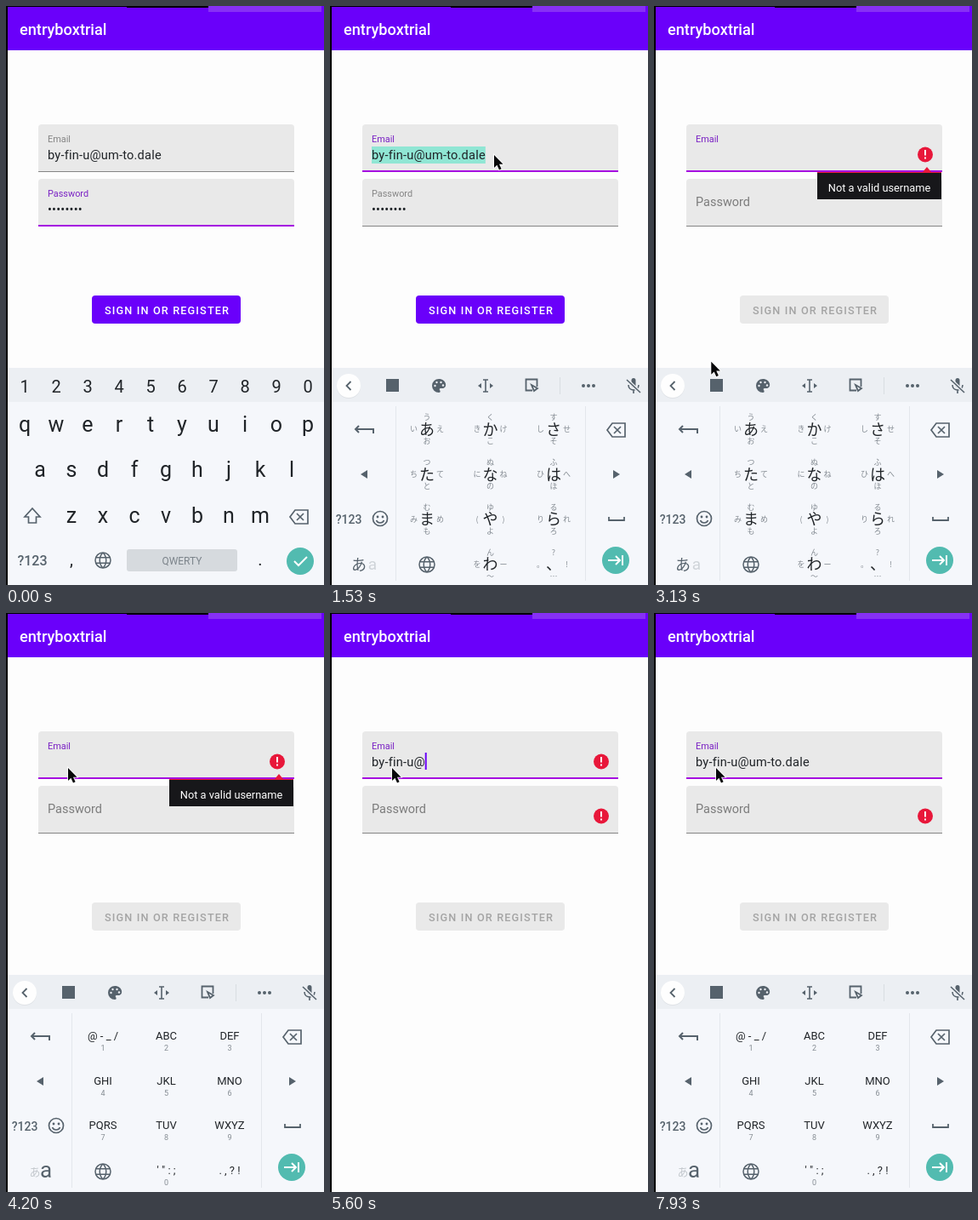
Recreate the animation shown at these times as an HTML page with a canvas. Size 374 by 680 pixels, loop 8000 ms.

```html
<!DOCTYPE html>
<html lang="en">
<head>
<meta charset="utf-8">
<title>Sign in form</title>
<style>
html, body { margin: 0; width: 100%; height: 100%; overflow: hidden; background: #fdfdfd; }
canvas { display: block; }
</style>
</head>
<body>
<canvas id="stage" width="374" height="680"></canvas>
<script>
const ctx = document.getElementById('stage').getContext('2d');
const LOOP = 8000;
const PURPLE = '#6a00fa', ACCENT = '#a50ce0', LABEL = '#7a22c4', RED = '#e8173a', TEAL = '#52bbb0';
const INK = '#202428', GREY = '#56626c', SOFT = '#848b92', FIELD = '#e9e9e9', BAR = '#eceff3', KEYS = '#f5f7fb';
const SANS = 'Roboto, sans-serif', KANA = '"Noto Sans CJK JP", "Noto Sans CJK", sans-serif';
const ADDRESS = 'by-fin-u@um-to.dale';

const typedAt = [4470, 4600, 4730, 4930, 5000, 5130, 5270, 5330, 5530, 6070,
  6200, 6600, 6930, 7130, 7330, 7400, 7530, 7600, 7730];
// Each stop: time, x, y.
const pointerPath = [[70, 350, 300], [200, 290, 250], [400, 290, 250], [600, 193, 175],
  [1670, 193, 175], [2070, 147, 238], [2530, 147, 238], [2800, 95, 180], [2930, 95, 180],
  [3330, 40, 652], [3530, 40, 652], [4130, 73, 182], [8000, 73, 182]];

function text(str, x, y, size, color = INK, o = {}) {
  ctx.font = `${o.weight || 400} ${size}px ${o.family || SANS}`;
  ctx.textAlign = o.align || 'center';
  ctx.textBaseline = o.base || 'alphabetic';
  ctx.letterSpacing = (o.gap || 0) + 'px';
  ctx.fillStyle = color;
  ctx.fillText(str, x, y);
  ctx.letterSpacing = '0px';
}

function rect(x, y, w, h, color, radius = 0) {
  ctx.fillStyle = color;
  ctx.beginPath();
  ctx.roundRect(x, y, w, h, radius);
  ctx.fill();
}

function disc(x, y, r, color) {
  ctx.fillStyle = color;
  ctx.beginPath();
  ctx.arc(x, y, r, 0, Math.PI * 2);
  ctx.fill();
}

// SVG path data centred on (x, y); stroked when a line width is given.
function icon(d, x, y, color = GREY, width = 0) {
  const path = new Path2D(d);
  ctx.save();
  ctx.translate(x, y);
  if (width) {
    ctx.strokeStyle = color;
    ctx.lineWidth = width;
    ctx.stroke(path);
  } else {
    ctx.fillStyle = color;
    ctx.fill(path);
  }
  ctx.restore();
}

function globe(x, y) {
  icon('M-9 0A9 9 0 1 0 9 0A9 9 0 1 0-9 0M-8-3.2H8M-8 3.2H8M0-9C-5-4-5 4 0 9C5 4 5-4 0-9', x, y, GREY, 1.5);
}

function backspace(x, y) {
  icon('M-11 0L-5-8H10V8H-5ZM-3-4L5 4M5-4L-3 4', x, y, GREY, 1.7);
}

function qwertyKeyboard() {
  rect(2, 425, 372, 255, KEYS);
  rect(2, 425, 372, 40, BAR);
  const row = (keys, x, y, size) => [...keys].forEach((k, i) => text(k, x + 37 * i, y, size));
  row('1234567890', 22, 454, 20);
  row('qwertyuiop', 22, 500, 25);
  row('asdfghjkl', 40, 553, 25);
  row('zxcvbnm', 77, 607, 25);
  icon('M0-9L9 1H4.5V8H-4.5V1H-9Z', 31, 599, GREY, 1.7);
  backspace(345, 600);
  text('?123', 31, 657, 16, GREY, { weight: 500 });
  text(',', 77, 657, 20);
  globe(114, 651);
  rect(142, 638, 130, 26, '#d6dade', 3);
  text('QWERTY', 207, 656, 12, '#7c848b');
  text('.', 299, 657, 20);
  disc(346, 652, 16, TEAL);
  icon('M-7 0L-2 5L8-5', 346, 652, '#fff', 2);
}

function toolbar() {
  rect(2, 425, 372, 40, BAR);
  disc(22, 447, 14, '#dfe2e6');
  disc(22, 446, 14, '#fefefe');
  icon('M2.5-5L-2.5 0L2.5 5', 22, 446, GREY, 1.8);
  rect(66, 438, 15, 15, GREY);
  icon('M0-8A8 8 0 0 0 0 8C2 8 2 6 1 5C0 3 2 3 4 3C11 3 9-8 0-8Z', 128, 446);
  for (const [x, y] of [[-4.5, 0], [-2.5, -4], [2.5, -4], [5, -.5]]) disc(128 + x, 446 + y, 1.2, BAR);
  icon('M-3-7H3M0-7V7M-3 7H3', 183, 446, GREY, 1.6);
  icon('M-9 0L-5-3V3ZM9 0L5-3V3Z', 183, 446);
  icon('M1 6.5H-6.5V-6.5H6.5V2M0 0L7 4L3 7Z', 237, 445, GREY, 1.8);
  rect(270, 436, 1, 20, '#d9dde2');
  for (const x of [298, 304, 310]) disc(x, 446, 2, GREY);
  rect(354.5, 437, 5, 11, GREY, 2.5);
  icon('M-6-1C-6 7 6 7 6-1M0 5V9', 357, 446, GREY, 1.6);
  icon('M-8-7L8 8', 357, 446, BAR, 4);
  icon('M-8-7L8 8', 357, 446, GREY, 1.6);
}

const kanaKeys = ['あいうえお', 'かきくけこ', 'さしすせそ', 'たちつてと', 'なにぬねの', 'はひふへほ',
  'まみむめも', 'や(ゆ)よ', 'らりるれろ', 'わをんー〜', '、。?!…'];
const latinKeys = ['@ - _ /', 'ABC', 'DEF', 'GHI', 'JKL', 'MNO', 'PQRS', 'TUV', 'WXYZ', '\' " : ;', '. , ? !'];

function flickKeyboard(latin) {
  rect(2, 425, 372, 255, KEYS);
  rect(77, 470, 1, 205, '#e3e7ec');
  rect(300, 470, 1, 205, '#e3e7ec');
  toolbar();
  const mid = { family: KANA, base: 'middle' };
  (latin ? latinKeys : kanaKeys).forEach((key, i) => {
    const slot = i < 9 ? i : i + 1;
    const x = 114 + 74.5 * (slot % 3), y = 497 + 52.7 * Math.floor(slot / 3);
    if (latin) {
      text(key, x, y + 4, 13);
      if (i < 10) text(i < 9 ? i + 1 : 0, x, y + 17, 9, SOFT);
    } else {
      const [main, left, up, right, down] = key;
      text(main, x, y, 18, INK, mid);
      text(left, x - 15.5, y, 9, SOFT, mid);
      text(up, x, y - 14, 9, SOFT, mid);
      text(right, x + 15.5, y, 9, SOFT, mid);
      text(down, x, y + 14, 9, SOFT, mid);
    }
  });
  globe(114, 656);
  icon('M-6-4L-10 0L-6 4M-10 0H11V5', 40, 497, GREY, 2);
  icon('M-4 0L4-5V5Z', 40, 550);
  icon('M4 0L-4-5V5Z', 337, 550);
  text('?123', 22, 608, 14, GREY, { weight: 500 });
  icon('M-8.5 0A8.5 8.5 0 1 0 8.5 0A8.5 8.5 0 1 0-8.5 0M-4.5 2C-3 6 3 6 4.5 2', 59, 602, GREY, 1.7);
  disc(56, 600, 1.4, GREY);
  disc(62, 600, 1.4, GREY);
  text('あ', 34, 656, latin ? 13 : 18, latin ? '#c3c8cd' : GREY, { ...mid, weight: latin ? 400 : 500 });
  text('a', latin ? 47 : 50, latin ? 663 : 662, latin ? 26 : 19, latin ? GREY : '#cfd4d9');
  backspace(337, 498);
  icon('M-9-2V2H9V-2', 337, 602, GREY, 1.8);
  disc(336, 651, 16, TEAL);
  icon('M-9 0H4M0-5L5 0L0 5M8-6V6', 336, 651, '#fff', 2);
}

function field(label, y, value, focused, o) {
  rect(38, y, 301, 56, FIELD, [4, 4, 0, 0]);
  if (focused) rect(38, y + 54, 301, 2, ACCENT);
  else rect(38, y + 55, 301, 1, '#858585');
  if (focused || value) text(label, 49, y + 21, 10.9, focused ? LABEL : '#858585', { align: 'left' });
  else text(label, 49, y + 32, 14.5, '#7c7c7c', { align: 'left' });
  ctx.font = `14.6px ${SANS}`;
  ctx.letterSpacing = '0.2px';
  const width = ctx.measureText(value).width;
  if (o.selected) rect(49, y + 26, width, 20, '#90e6d4');
  text(value, 49, y + 41, 14.6, INK, { align: 'left', gap: .2 });
  if (focused && o.caret) rect(49 + width, y + 25, 2, 20, PURPLE);
  if (o.error) {
    disc(319, y + 35.5, 9, RED);
    rect(318, y + 30, 2, 6.5, '#fff');
    rect(318, y + 38.5, 2, 2, '#fff');
  }
}

function popup() {
  icon('M-5 6L0 0L5 6Z', 321, 189, RED);
  rect(192, 195, 146, 32, '#17171a');
  rect(192, 195, 146, 1, RED);
  text('Not a valid username', 265, 217.5, 12.8, '#fff');
}

function pointer(t) {
  if (t < pointerPath[0][0]) return;
  const i = pointerPath.findIndex(stop => stop[0] > t);
  const [t0, x0, y0] = pointerPath[i - 1], [t1, x1, y1] = pointerPath[i];
  const u = (t - t0) / (t1 - t0), k = u * u * (3 - 2 * u);
  const x = x0 + (x1 - x0) * k, y = y0 + (y1 - y0) * k;
  const arrow = 'M0 0V15L3.4 11.8L6 17.5L8.6 16.3L6 10.8H10.6Z';
  icon(arrow, x, y, '#fff', 1.6);
  icon(arrow, x, y, '#08080a');
}

function draw(t) {
  const within = (a, b) => t >= a && t < b;
  const count = typedAt.filter(at => at <= t).length;
  const email = t < 1600 ? ADDRESS : ADDRESS.slice(0, count);
  const password = t < 2270 ? '•'.repeat(8) : '';
  const onEmail = within(600, 2070) || t >= 2800;
  const badEmail = within(1600, 4470) || within(5530, 7400);
  const emailSelected = within(1070, 1600), passwordSelected = within(2200, 2270);
  const lastEvent = Math.max(...[600, 1600, 2070, 2330, 2800, ...typedAt].filter(at => at <= t), 0);
  const caret = t >= 600 && !emailSelected && !passwordSelected && !within(4200, 4470)
    && Math.floor((t - lastEvent) / 200) % 2 === 0;

  rect(0, 0, 374, 680, '#fdfdfd');
  rect(0, 0, 2, 680, '#000');
  rect(2, 0, 372, 52, PURPLE);
  rect(2, 0, 140, 1, '#000');
  rect(142, 0, 96, 2, '#000');
  rect(238, 0, 133, 7, '#8730f5');
  text('entryboxtrial', 16, 34, 18.2, '#fff', { align: 'left', weight: 500 });

  field('Email', 139, email, onEmail, { caret, selected: emailSelected, error: badEmail });
  field('Password', 203, password, !onEmail, { caret, selected: passwordSelected, error: t >= 4470 });

  const enabled = t < 1600;
  rect(101, 340, 175, 33, enabled ? PURPLE : FIELD, 4);
  text('SIGN IN OR REGISTER', 116, 361.5, 12.7, enabled ? '#fff' : '#a4a4a4',
    { align: 'left', weight: 500, gap: 1.14 });

  if (!within(5470, 5870)) {
    if (onEmail) flickKeyboard(t >= 3470);
    else qwertyKeyboard();
  }
  if (within(1670, 2070) || within(2930, 4470) || within(5870, 7400)) popup();
  pointer(t);
}

function tick(now) {
  draw(now % LOOP);
  requestAnimationFrame(tick);
}
draw(0);
requestAnimationFrame(tick);
</script>
</body>
</html>
```
